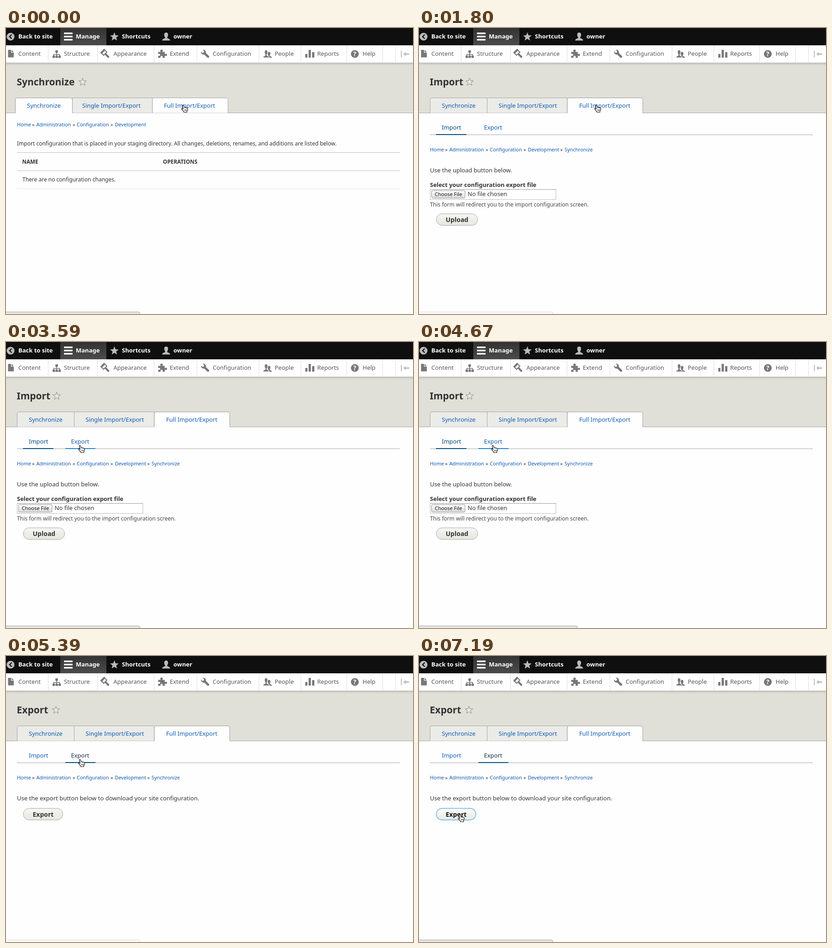
An HTML page for the animation above (8 s loop, 892x628 px).

```html
<!DOCTYPE html>
<html lang="en">
<head>
<meta charset="utf-8">
<title>Configuration screens</title>
<style>
  html, body { margin: 0; width: 100%; height: 100%; overflow: hidden; background: #fefefe; }
  svg { display: block; width: 892px; height: 628px; }
  text { font-family: "Noto Sans", "Open Sans", sans-serif; white-space: pre; }
</style>
</head>
<body>
<svg id="stage" viewBox="0 0 892 628" xmlns="http://www.w3.org/2000/svg"></svg>
<script>
const LOOP = 8000;
const LINK = '#0d5bb5', INK = '#333', ICON = '#777', PALE = '#bbb', EDGE = '#a6a6a6';

const text = (x, y, str, size = 13, fill = INK, bold = false) =>
  `<text x="${x}" y="${y}" font-size="${size}" fill="${fill}"${bold ? ' font-weight="700"' : ''}>${str}</text>`;
const rect = (x, y, w, h, fill, extra = '') =>
  `<rect x="${x}" y="${y}" width="${w}" height="${h}" fill="${fill}" ${extra}/>`;
const path = (d, fill, extra = '') => `<path d="${d}" fill="${fill}" ${extra}/>`;
const circle = (x, y, r, fill) => `<circle cx="${x}" cy="${y}" r="${r}" fill="${fill}"/>`;
const at = (x, y, body, extra = '') => `<g transform="translate(${x} ${y}) ${extra}">${body}</g>`;
const group = (id, body) => `<g id="${id}">${body}</g>`;
const stroke = (color, width = 1) => `stroke="${color}" stroke-width="${width}"`;
const gradient = (id, ...stops) =>
  `<linearGradient id="${id}" x2="0" y2="1">${stops.map((c, i) =>
    `<stop offset="${i / (stops.length - 1)}" stop-color="${c}"/>`).join('')}</linearGradient>`;

function star(x, y, r, fill, extra) {
  let d = '';
  for (let i = 0; i < 10; i++) {
    const a = i * Math.PI / 5 - Math.PI / 2, q = i % 2 ? r * 0.42 : r;
    d += (i ? 'L' : 'M') + (x + q * Math.cos(a)).toFixed(2) + ' ' + (y + q * Math.sin(a)).toFixed(2);
  }
  return path(d + 'Z', fill, extra);
}

const person = (x, y, fill) => at(x, y,
  path('M0 -9C3.3 -9 4.4 -6.6 4.2 -3.6C4 -1.2 3 .6 2.3 1.4V3C4 4.4 8.6 4.6 8.8 8.6H-8.8C-8.6 4.6 -4 4.4 -2.3 3V1.4C-3 .6 -4 -1.2 -4.2 -3.6C-4.4 -6.6 -3.3 -9 0 -9Z', fill));

function topBar() {
  return rect(0, 0, 892, 38, '#0f0f0f') + rect(119, 0, 101, 38, 'url(#manage)') +
    circle(10, 19, 8.6, PALE) + path('M12.5 14.5L8 19L12.5 23.5', 'none', stroke('#0f0f0f', 2.4)) +
    [10, 17, 24].map(y => rect(127, y, 19, 3.4, '#fff', 'rx="1"')).join('') +
    star(237.5, 19.5, 10, PALE) + person(351, 19, PALE) +
    [[27, 'Back to site'], [153, 'Manage'], [254, 'Shortcuts'], [367, 'owner']]
      .map(([x, s]) => text(x, 23, s, 13, '#fff', true)).join('');
}

function trayIcons() {
  const sheet = path('M4.5 48H11V54H17V64.5H4.5ZM12.2 48L17 52.8H12.2Z', ICON);
  const tree = path('M111 54V60M104.5 61V58H117.5V61M111 58V61', 'none', stroke(ICON, 1.6)) +
    rect(108.2, 49, 5.6, 5.6, ICON, 'rx="1"') +
    [102, 108.4, 114.8].map(x => rect(x, 60.4, 5.4, 5.4, ICON, 'rx="1"')).join('');
  const hammer = at(217.5, 56.5,
    rect(-8.4, -5, 8.4, 10, 'none', stroke(ICON, 2)) + rect(-9.4, -6, 4, 12, ICON) +
    rect(0, -2, 11.5, 4.2, ICON, 'rx="1.5"'), 'rotate(45)');
  const puzzle = path('M333.5 52.5H338.5C339.5 51 337.6 50.4 338.2 48.8C338.9 47 342.9 47 343.6 48.8C344.2 50.4 342.3 51 343.3 52.5H348V57C349.6 58 350.2 56 351.7 56.6C353.4 57.3 353.4 60.9 351.7 61.5C350.2 62 349.6 60.2 348 61.2V65.5H343.4C342.6 64 344 63.6 343.4 62.2C342.8 60.9 339.2 60.9 338.6 62.2C338 63.6 339.4 64 338.6 65.5H333.5V61C335.2 60.2 335.6 61.6 336.9 61C338.2 60.4 338.2 57.4 336.9 56.8C335.6 56.2 335.2 57.6 333.5 56.8Z', ICON);
  const wrench = path('M431 47.6L434.3 51L433.4 54L430.5 54.8L427.3 51.6C427 55.5 430 59.4 434.6 58.4L441.6 65.2C443.4 66.7 446.6 63.6 445 61.7L438.2 54.9C439 50.5 435.4 47 431 47.6Z', ICON);
  const people = at(576.5, 59, person(0, 0, ICON), 'scale(.72)') +
    at(570, 57, `<g stroke="#fff" stroke-width="1.3">${person(0, 0, ICON)}</g>`, 'scale(.8 .98)');
  const bars = rect(656, 57, 4.6, 8, ICON) + rect(663.3, 48, 4.8, 17, ICON) + rect(671, 53, 4.8, 12, ICON);
  const help = circle(764.5, 57, 8.6, ICON) + text(760.9, 62, '?', 14, '#fff', true);
  const collapse = rect(865.5, 50, 2, 14.5, PALE) +
    path('M871 57.2L876 52.5V55.7H883.5V58.7H876V62Z', PALE);
  return sheet + tree + hammer + puzzle + wrench + people + bars + help + collapse;
}

function tray() {
  const items = [[27, 'Content'], [127, 'Structure'], [235.5, 'Appearance'], [359, 'Extend'],
    [453, 'Configuration'], [589, 'People'], [682, 'Reports'], [781.5, 'Help']];
  return rect(0, 38, 892, 38, '#fff') +
    [92, 200, 324, 418, 554, 646, 746, 825, 853].map(x => rect(x, 38, 1, 37, '#ddd')).join('') +
    trayIcons() + items.map(([x, s]) => text(x, 61, s, 13, '#565656')).join('');
}

const header = rect(0, 76, 892, 110, '#e0e0d8') + rect(0, 75, 892, 7, 'url(#shade)') +
  rect(0, 75, 892, 1, '#aaa') + rect(0, 186, 892, 1, EDGE);

function tabs(x, active, hovered) {
  const labels = ['Synchronize', 'Single Import/Export', 'Full Import/Export'];
  const widths = [125, 175.5, 165.5], labelX = active ? [50, 174.5, 351] : [46, 167, 346];
  let out = '', front = '';
  labels.forEach((s, i) => {
    const w = widths[i], on = i === active, end = i === 2 || on ? 4 : 0, start = i === 0 || on ? 4 : 0;
    const d = `M${x} 186.5V${153.5 + start}q0 ${-start} ${start} ${-start}H${x + w - end}q${end} 0 ${end} ${end}V186.5`;
    const tab = path(d, on || i === hovered ? '#fefefe' : '#ebebe8', stroke(on ? '#999' : EDGE)) +
      (on ? rect(x + .5, 185.5, w - 1, 2, '#fefefe') : '');
    if (on) front = tab; else out += tab;
    x += w;
  });
  return out + front + labels.map((s, i) => text(labelX[i], 175, s, 13, LINK)).join('');
}

function crumbs(y, deep) {
  const links = [[24, 'Home'], [66.5, 'Administration'], [155, 'Configuration'], [238.5, 'Development']];
  if (deep) links.push([319, 'Synchronize']);
  return links.map(([x, s]) => text(x, y, s, 10.9, LINK)).join('') +
    [57, 146, 229, 309.5].slice(0, links.length - 1).map(x => text(x, y, '»', 10.9)).join('');
}

const title = (str, starX) => text(23.5, 125.5, str, 21, INK, true) +
  star(starX, 118.8, 8.8, '#e8e8e2', stroke('#8a8a85') + ' stroke-linejoin="round"');

const button = (id, y, w, label) => group(id,
  rect(38, y, w, 25.5, 'url(#btn)', `rx="12.7" ${stroke(EDGE)}`) + text(58.5, y + 18, label, 14, INK, true));

function subTabs(exporting) {
  const on = '#004875', x = exporting ? 130 : 37;
  return rect(24, 234, 839, 1, EDGE) + rect(x, 233, exporting ? 66 : 67, 2, '#004f80') +
    text(50, 223, 'Import', 13, exporting ? LINK : on) +
    text(142.5, 223, 'Export', 13, exporting ? '#12304c' : LINK);
}

const syncPage = title('Synchronize', 168) + tabs(20.5, 0, 2) + crumbs(215.5) +
  text(24, 258, 'Import configuration that is placed in your staging directory. All changes, deletions, renames, and additions are listed below.', 12.03) +
  rect(24, 273, 839, 1, '#bebfb9') + rect(24, 313, 839, 1, '#bebfb9') + rect(24, 352.5, 839, 1, '#e3e3df') +
  text(35.5, 297.5, 'NAME', 11.7, INK, true) + text(344, 297.5, 'OPERATIONS', 11.8, INK, true) +
  text(36, 337, 'There are no configuration changes.', 12);

const importPage = title('Import', 111) + tabs(24.5, 2) + subTabs(false) +
  group('hoverLine', rect(130, 233, 66, 2, '#1a86d6')) + crumbs(270.5, true) +
  text(24, 317, 'Use the upload button below.') +
  text(24, 348.5, 'Select your configuration export file', 12.95, INK, true) +
  rect(24.5, 354.5, 275.5, 22, '#fff', stroke('#bbb')) + rect(24, 354, 276.5, 1, '#999') +
  rect(27.5, 357, 73.5, 16.5, 'url(#pick)', `rx="3" ${stroke('#8f8f8f')}`) +
  text(34.5, 369, 'Choose File', 11.2, '#111') + text(106.5, 369, 'No file chosen', 13) +
  text(24, 392, 'This form will redirect you to the import configuration screen.', 12.05, '#444') +
  button('upload', 408, 90.5, 'Upload');

const exportPage = title('Export', 109.5) + tabs(24.5, 2) + subTabs(true) + crumbs(270.5, true) +
  text(24, 317, 'Use the export button below to download your site configuration.') +
  button('download', 334.5, 86.5, 'Export');

const hand = path('M-4.3 -6Q-4.6 -7.8 -3.2 -8Q-2 -8 -1.5 -6.6L0 -2.4Q1.5 -3.6 2.4 -2Q4 -3 4.8 -1.4Q7 -2.2 7.3 0Q7.5 3 5.5 6V8H-.8Q-1.5 5.8 -3.5 4L-6 .8Q-6.3 -1 -4.5 -.6L-2.6 1Z',
  '#fff', stroke('#111', 1.2) + ' stroke-linejoin="round"') +
  path('M.6 1.5V5M2.6 1.5V5M4.6 1.5V5', 'none', stroke('#111', .8));

const stage = document.getElementById('stage');
stage.innerHTML = '<defs>' + gradient('manage', '#333', '#4b4b4b') + gradient('shade', '#b5b5af', '#e0e0d8') +
  gradient('btn', '#f6f6f3', '#e7e7df') + gradient('btnOver', '#fcfcfa', '#ebeae3') +
  gradient('pick', '#fff', '#ddd') + '</defs>' +
  rect(0, 0, 892, 628, '#fefefe') +
  group('chrome', header + topBar() + tray()) +
  group('sync', syncPage) + group('import', importPage) + group('export', exportPage) +
  group('status', path('', '#e6e6e4', stroke('#a0a0a0')) + text(4, 635.5, '', 11, '#222')) +
  group('cursor', hand);

const el = id => document.getElementById(id);
const show = (id, on) => el(id).style.display = on ? '' : 'none';

// Each track lists [start time, value]; the latest start that has passed applies.
const tracks = {
  page: [[0, 'sync'], [1440, ''], [1800, 'import'], [5030, ''], [5390, 'export']],
  cursor: [[0, [391, 177]], [2880, [165, 240]], [3240, [165, 235]], [6110, [92, 370]], [6470, [92, 367]], [6830, [92, 356]]],
  // status: width, then 1 for solid or 0 for faded
  status: [[0, [294, 1]], [1800, [294, 0]], [2160, null], [2880, [294, 0]], [3240, [294, 1]],
    [4670, [348, 1]], [5390, [294, 0]], [5750, null], [7190, [294, 1]]],
  note: [[0, 'across for each kind'], [2880, 'loading the page for each kind'], [3590, 'across for each kind']],
  press: [[0, 0], [6110, 1], [6470, 2], [6830, 3]]
};
tracks.status.splice(6, 0, [5030, [294, 1]]);
const value = (name, t) => tracks[name].filter(([start]) => start <= t).pop()[1];

function render(t) {
  const page = value('page', t);
  show('chrome', page);
  for (const id of ['sync', 'import', 'export']) show(id, page === id);
  show('hoverLine', t >= 2880);

  const [x, y] = value('cursor', t);
  el('cursor').setAttribute('transform', `translate(${x} ${y})`);

  const status = value('status', t);
  show('status', status);
  if (status) {
    const [w, solid] = status, [box, note] = el('status').children;
    box.setAttribute('d', `M-2 623.5H${w - 4}Q${w - .5} 623.5 ${w - .5} 627V632H-2Z`);
    box.setAttribute('fill', solid ? '#e6e6e4' : '#fbfbfa');
    box.setAttribute('stroke', solid ? '#a0a0a0' : '#d8d8d6');
    note.setAttribute('fill', solid ? '#222' : '#777');
    note.textContent = value('note', t);
  }

  const press = value('press', t), [face, label] = el('download').children;
  face.setAttribute('fill', press > 1 ? 'url(#btnOver)' : 'url(#btn)');
  face.setAttribute('stroke', press > 2 ? '#5ab4ea' : press ? '#999' : EDGE);
  face.setAttribute('stroke-width', press > 2 ? 1.4 : 1);
  label.setAttribute('fill', press > 1 ? '#111' : INK);
}

const begin = performance.now();
function tick() {
  render((performance.now() - begin) % LOOP);
  requestAnimationFrame(tick);
}
tick();
</script>
</body>
</html>
```
